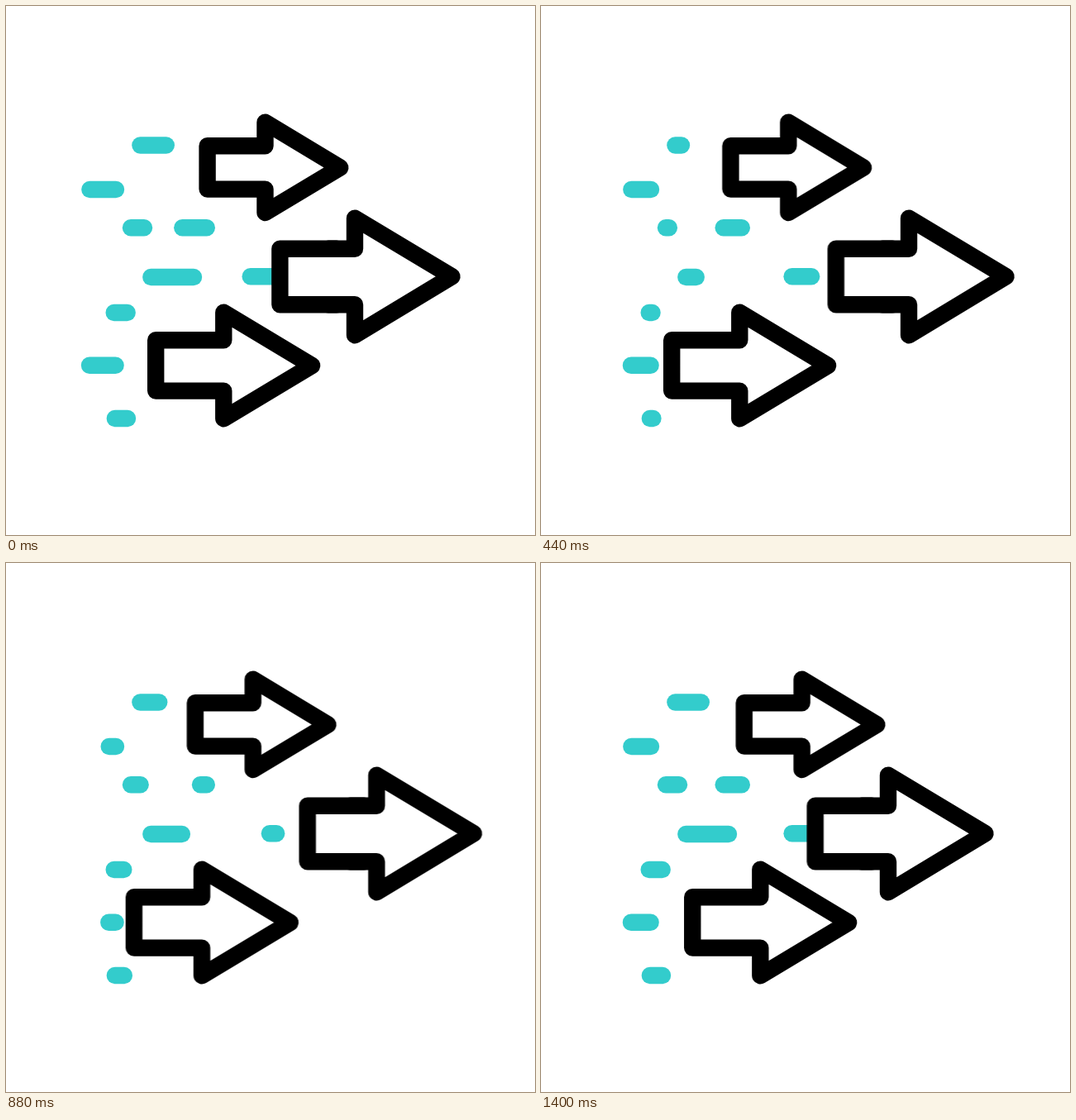
Animation, 640 px wide and 640 px high, one loop 1.44 s. Source, as an HTML page without scripts:

```html
<!DOCTYPE html>
<html lang="en">
<head>
<meta charset="utf-8">
<title>Flying arrows</title>
<style>
  html, body { margin: 0; width: 100%; height: 100%; overflow: hidden; background: #fff; }
  svg { display: block; width: 100%; height: 100%; }

  path { fill: none; stroke-width: 20.4; stroke-linecap: round; stroke-linejoin: round; }
  .arrow { stroke: #000; }
  .dashes { stroke: #3cc; stroke-dasharray: 100 102; }

  .arrow, .jolt, .dashes { animation: 720ms cubic-bezier(.333, 0, .667, 1) infinite alternate; }
  .arrow { animation-name: drift; }
  .jolt { animation-name: jolt; animation-duration: 120ms; }
  .steady { animation-name: steady; animation-duration: 1440ms; animation-direction: normal; }
  .rapid { animation-name: rapid; animation-duration: 240ms; animation-direction: normal; }

  @keyframes drift { to { transform: translateX(var(--drift)); } }
  @keyframes jolt { to { transform: translateX(var(--jolt)); } }

  /* Each -101 step either empties or refills a dash, right to left. */
  @keyframes rapid {
    0% { stroke-dashoffset: 0; }
    50% { stroke-dashoffset: -101; }
    100% { stroke-dashoffset: -202; }
  }
  @keyframes steady {
    0%, 8.3333% { stroke-dashoffset: 0; }
    16.6667% { stroke-dashoffset: -101; }
    25% { stroke-dashoffset: -202; }
    33.3333% { stroke-dashoffset: -303; }
    41.6667% { stroke-dashoffset: -404; }
    50% { stroke-dashoffset: -505; }
    58.3333% { stroke-dashoffset: -606; }
    66.6667% { stroke-dashoffset: -707; }
    75% { stroke-dashoffset: -808; }
    83.3333% { stroke-dashoffset: -909; }
    91.6667%, 100% { stroke-dashoffset: -1010; }
  }
</style>
</head>
<body>
<svg viewBox="0 0 640 640">
  <g class="dashes steady">
    <path pathLength="100" d="M193.8 168.5H162.4"/>
    <path pathLength="100" d="M167 268.3H151"/>
    <path pathLength="100" d="M227 328H175.3"/>
    <path pathLength="100" d="M146.7 371H130.7"/>
    <path pathLength="100" d="M147 499H131.8"/>
  </g>
  <g class="dashes rapid">
    <path pathLength="100" d="M133 222H101.4"/>
    <path pathLength="100" d="M242.8 268.3H213.3"/>
    <path pathLength="100" d="M327.2 327.2H295.7"/>
    <path pathLength="100" d="M132.6 434.7H101"/>
  </g>

  <g class="arrow" style="--drift: -24.9px; --jolt: 9.6px">
    <path class="jolt" d="M243.6 169.2H313.5V140.7L404.3 195.4L313.5 250V221.6H243.6Z"/>
  </g>
  <g class="arrow" style="--drift: 38.2px; --jolt: -9.6px">
    <path d="M400 293.7H331.4V361.2H400"/>
    <path class="jolt" d="M390 293.7H422V256.7L539.5 327.3L422 398.3V361.2H390"/>
  </g>
  <g class="arrow" style="--drift: -38.2px; --jolt: 9.6px">
    <path class="jolt" d="M181.2 404.3H263.3V370.7L370.2 435L263.3 499.3V465.6H181.2Z"/>
  </g>
</svg>
</body>
</html>
```
